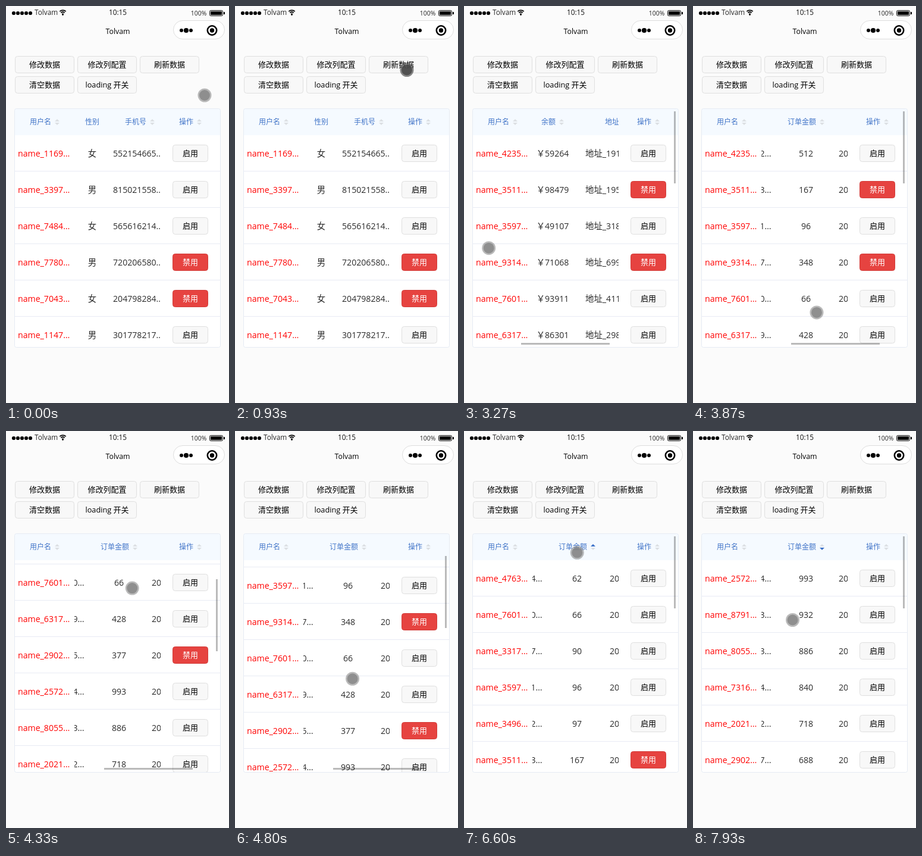
These frames come from a looping animation (375 px wide and 667 px high, 8 s). An HTML page with a canvas:

```html
<!DOCTYPE html>
<html lang="zh-CN">
<head>
<meta charset="utf-8">
<title>Table demo</title>
<style>
html, body { margin: 0; width: 100%; height: 100%; overflow: hidden; background: #fbfbfb; }
canvas { display: block; width: 375px; height: 667px; }
</style>
</head>
<body>
<canvas id="stage" width="375" height="667"></canvas>
<script>
const LOOP = 8000, FPS = 15, ROW = 61, TOP = 217, BODY = 14.4;
const APP = 'Tolvam';
const LATIN = '"Open Sans", "Noto Sans", sans-serif';
const CJK = '"Noto Sans CJK SC", "Noto Sans CJK", sans-serif';

const screen = document.getElementById('stage').getContext('2d');
const layer = document.createElement('canvas');
layer.width = 375;
layer.height = 667;
const hidden = layer.getContext('2d');
let g = screen;

// ---- data
let seed = 7;
function random(min, max) {
  seed = seed * 16807 % 2147483647;
  return min + seed % (max - min);
}
// "name amount address balance"; missing fields are random, "!" marks a blocked user
function user(item, i) {
  const [name, amount, addr, cash] = item.replace('!', '').split(' ');
  return {
    name: `name_${name}…`,
    off: item[0] === '!',
    amount: +amount || random(180, 660),
    addr: `地址_${addr || random(10000, 99999)}…`,
    cash: '￥' + (cash || random(10000, 99999)),
    sex: i % 2 ? '男' : '女',
    phone: random(1e8, 1e9) + '…',
    date: '2020-10-1…'
  };
}
const before = ['1169', '3397', '7484', '!7780', '!7043', '1147'].map(user);
const after = [
  '4235 512 19142 59264', '!3511 167 19563 98479', '3597 96 31841 49107',
  '!9314 348 69927 71068', '7601 66 41130 93911', '6317 428 29859 86301',
  '!2902 377', '2572 993', '8055 886', '2021 718', '4763 62', '3317 90',
  '3496 97', '8791 932', '7316 840', '2902 688',
  ...Array.from({ length: 4 }, () => String(random(1000, 9999)))
].map(user);
const rising = [...after].sort((a, b) => a.amount - b.amount);
const falling = [...rising].reverse();

const columns = [
  { title: '性别', key: 'sex', w: 60 },
  { title: '手机号', key: 'phone', w: 100, sort: true, left: true },
  { title: '余额', key: 'cash', w: 100, sort: true },
  { title: '地址', key: 'addr', w: 100, left: true },
  { title: '订单金额', key: 'amount', w: 100, sort: true },
  { title: '日期', key: 'date', w: 120, left: true }
];

// ---- motion
const within = (t, a, b) => t >= a && t < b;
function ease(t, from, to) {
  const u = Math.min(1, Math.max(0, (t - from) / (to - from)));
  return u * (2 - u);
}
// moves of the finger: start, end, x, y
const moves = [
  [50, 870, 288.5, 107],
  [2270, 2930, 217, 397],
  [3010, 3330, 34, 406.5],
  [3400, 3930, 210, 516],
  [4030, 4510, 212, 224],
  [4602, 5200, 185, 571],
  [5250, 5740, 187, 214],
  [5790, 6000, 189.5, 204],
  [6590, 6930, 194, 200],
  [7400, 7930, 167, 317]
];
function finger(t) {
  let x = 333.5, y = 149.5;
  for (const [from, to, tx, ty] of moves) {
    const e = ease(t, from, to);
    x += (tx - x) * e;
    y += (ty - y) * e;
  }
  return { x, y };
}
// the table follows the finger while dragged, then glides on
function scroll(t) {
  const { x, y } = finger(t);
  const sx = t < 3010 ? 0 : (t < 3330 ? 217 - x : 183) + 152 * ease(t, 3270, 3870);
  const sy = within(t, 4030, 5240) ? Math.max(0, 501 + 25 * ease(t, 4340, 4600) - y) : 0;
  return { sx: Math.round(sx), sy: Math.round(sy) };
}

// ---- drawing helpers
function rect(x, y, w, h, fill) {
  g.fillStyle = fill;
  g.fillRect(x, y, w, h);
}
function round(x, y, w, h, r, fill, line) {
  g.beginPath();
  g.roundRect(x + .5, y + .5, w - 1, h - 1, r);
  if (fill) { g.fillStyle = fill; g.fill(); }
  if (line) { g.strokeStyle = line; g.lineWidth = 1; g.stroke(); }
}
function disc(x, y, r, fill) {
  g.beginPath();
  g.arc(x, y, r, 0, 7);
  g.fillStyle = fill;
  g.fill();
}
function arc(x, y, r, a, b, width, color) {
  g.beginPath();
  g.arc(x, y, r, a, b);
  g.lineWidth = width;
  g.strokeStyle = color;
  g.stroke();
}
function clip(x, y, w, h, draw) {
  g.save();
  g.beginPath();
  g.rect(x, y, w, h);
  g.clip();
  draw();
  g.restore();
}
// Chinese and Latin runs use their own fonts; x is the left edge or the middle
function text(str, x, y, size, color, centred) {
  const runs = String(str).match(/[\u3000-\u9fff\uff00-\uffef]+|[^\u3000-\u9fff\uff00-\uffef]+/g).map(s => {
    const font = s.charCodeAt(0) >= 0x3000 ? size + 'px ' + CJK : size * .98 + 'px ' + LATIN;
    g.font = font;
    return { s, font, w: g.measureText(s).width };
  });
  if (centred) x -= runs.reduce((sum, r) => sum + r.w, 0) / 2;
  g.fillStyle = color;
  for (const r of runs) {
    g.font = r.font;
    g.fillText(r.s, x, Math.round(y + size * .37));
    x += r.w;
  }
}
function button(label, x, y, w, style) {
  const [fill, line, ink] = {
    plain: ['#f8f8f8', '#dfdfdf', '#000'],
    down: ['#dedede', '#cfcfcf', 'rgba(0,0,0,.6)'],
    red: ['#e64340', '#d23d3a', '#fff']
  }[style];
  round(x, y, w, 29, 4, fill, line);
  text(label, x + w / 2, y + 14.5, 13, ink, true);
}
function triangle(x, y, dir, on) {
  g.beginPath();
  g.moveTo(x - 4, y);
  g.lineTo(x + 4, y);
  g.lineTo(x, y - 4 * dir);
  g.fillStyle = on ? '#3a70c8' : '#dcdfe3';
  g.fill();
}
function heading(title, mid, sort, state = 0) {
  const x = sort ? mid - 7 : mid, arrows = x + title.length * 6 + 10;
  text(title, x, 195, 12, '#4174c8', true);
  if (!sort) return;
  triangle(arrows, 194, 1, state > 0);
  triangle(arrows, 196, -1, state < 0);
}

// ---- scene parts
function phoneBar() {
  for (let i = 0; i < 5; i++) disc(13 + i * 7, 12, 3.1, '#000');
  text(APP, 48, 11, 12, '#222');
  for (let i = 1; i < 4; i++) arc(95.5, 15, i * 3 - 1.2, -2.3, -.84, 1.7, '#000');
  disc(95.5, 14.6, 1.3, '#000');
  text('10:15', 188, 11, 12, '#111', true);
  text('100%', 324, 12, 10.6, '#222', true);
  round(342, 7, 23, 10, 2, null, '#000');
  rect(344, 9, 19, 6, '#000');
  rect(366, 10, 2, 4, '#000');
  text(APP, 188, 42.5, 12.6, '#000', true);
  round(281, 24, 87, 32, 15.5, '#fff', '#dedede');
  for (let i = -1; i < 2; i++) disc(303 + i * 8, 41, i ? 3 : 4.1, '#000');
  arc(346.5, 41, 7.7, 0, 7, 2.6, '#000');
  disc(346.5, 41, 3.7, '#000');
}
function toolbar(t) {
  ['修改数据', '修改列配置', '刷新数据', '清空数据', 'loading 开关'].forEach((label, i) => {
    const down = i === 2 && within(t, 1120, 1190);
    button(label, 15 + i % 3 * 105, i < 3 ? 84 : 118, 100, down ? 'down' : 'plain');
  });
}
function eachColumn(sx, draw) {
  let x = 115 - sx;
  for (const c of columns) {
    if (x < 260 && x + c.w > 115) draw(c, x);
    x += c.w;
  }
}
function table(t) {
  const rows = t < 2190 ? before : t < 6260 ? after : t < 7260 ? rising : falling;
  const state = t < 6260 ? 0 : t < 7260 ? 1 : -1;
  const { sx, sy } = scroll(t);

  rect(15, 173, 345, 400, '#fff');
  clip(15, TOP, 345, 356, () => rows.forEach((row, i) => {
    const y = TOP + i * ROW - sy, mid = y + 30.5;
    if (y > 573 || y < TOP - ROW) return;
    rect(15, y + 60, 345, 1, '#e8ebf4');
    text(row.name, 20, mid, BODY, '#f00');
    clip(115, y, 145, ROW, () => eachColumn(sx, (c, x) =>
      text(row[c.key], c.left ? x + 5 : x + c.w / 2, mid, BODY, '#2b2b2b', !c.left)));
    button(row.off ? '禁用' : '启用', 280, y + 16, 60, row.off ? 'red' : 'plain');
  }));

  rect(15, 173, 345, 44, '#f5faff');
  heading('用户名', 65, true);
  clip(115, 173, 145, 44, () => eachColumn(sx, (c, x) =>
    heading(c.title, x + c.w / 2, c.sort, c.key === 'amount' ? state : 0)));
  heading('操作', 310, true);

  const bar = 'rgba(0,0,0,.27)';
  if (within(t, 1390, 5500) || t >= 6260) rect(353, Math.round(177 + sy * .303), 3, 121, bar);
  if (within(t, 3050, 5500)) rect(Math.round(19 + sx * .435), 566, 149, 3, bar);
}
function loading(t) {
  g = hidden;
  table(t);
  g = screen;
  clip(15, 173, 345, 400, () => {
    rect(15, 173, 345, 400, '#fff');
    g.filter = 'blur(2.5px)';
    g.drawImage(layer, 0, 0);
    g.filter = 'none';
    rect(15, 173, 345, 400, 'rgba(255,255,255,.3)');
  });
  const a = .17 + (t - 1933) * Math.PI / 500;
  arc(188, 373, 17, a + .65, a + 2 * Math.PI - .65, 4, '#b2b2b2');
}
function pointer(t) {
  const { x, y } = finger(t);
  const held = within(t, 920, 2120) || within(t, 5990, 6590) || within(t, 6920, 7460);
  disc(x + .5, y + .5, 11.5, held ? 'rgba(90,90,90,.72)' : 'rgba(140,140,140,.6)');
  disc(x + .5, y + .5, 9, held ? 'rgba(68,68,68,.8)' : 'rgba(128,128,128,.75)');
}

function frame(now) {
  // steps like a 15 fps screen recording
  const t = Math.floor((now % LOOP + 4) * FPS / 1000) * 1000 / FPS % LOOP;
  rect(0, 0, 375, 667, '#fbfbfb');
  phoneBar();
  toolbar(t);
  if (within(t, 1390, 2190)) loading(t);
  else table(t);
  round(14, 172, 347, 402, 3, null, '#e6ebf4');
  pointer(t);
}

let start;
function tick(now) {
  start ??= now;
  frame(now - start);
  requestAnimationFrame(tick);
}
requestAnimationFrame(tick);
</script>
</body>
</html>
```
